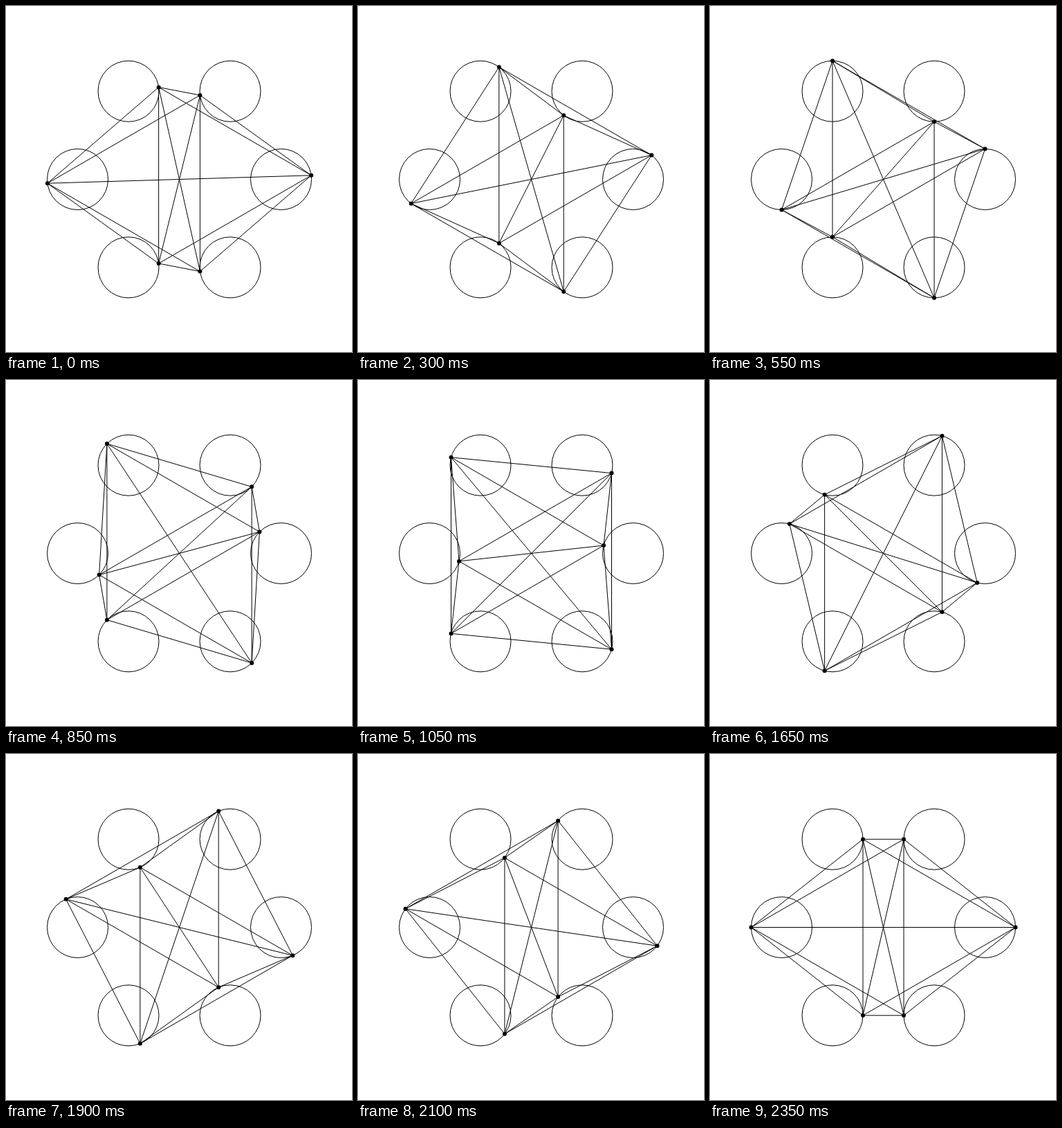
Write an HTML page with a canvas that moves like this. It is 500 by 500 pixels and loops after 2.4 s.

```html
<!DOCTYPE html>
<html lang="en">
<head>
<meta charset="utf-8">
<title>Six orbits</title>
<style>
  html, body { margin: 0; width: 100%; height: 100%; overflow: hidden; background: #fff; }
  canvas { display: block; width: 500px; height: 500px; }
</style>
</head>
<body>
<canvas id="stage" width="500" height="500"></canvas>
<script>
const ctx = document.getElementById('stage').getContext('2d');
const TAU = Math.PI * 2;
const LOOP = 2400, STEP = 50, STEPS = LOOP / STEP;
const MID = 250.5, RING = 147, ORBIT = 44, DOT = 3;

const polar = (cx, cy, r, a) => ({ x: cx + r * Math.cos(a), y: cy - r * Math.sin(a) });
const centers = Array.from({ length: 6 }, (_, i) => polar(MID, MID, RING, i * TAU / 6));

function circle({ x, y }, r) {
  ctx.beginPath();
  ctx.arc(x, y, r, 0, TAU);
}

function draw(step) {
  const turn = (step + 1) / STEPS * TAU;
  // Neighbouring orbits run half a turn apart.
  const dots = centers.map((c, i) => polar(c.x, c.y, ORBIT, turn + i * Math.PI));

  ctx.fillStyle = '#fff';
  ctx.fillRect(0, 0, 500, 500);
  ctx.fillStyle = ctx.strokeStyle = '#000';
  ctx.lineWidth = 1;

  for (const c of centers) {
    circle(c, ORBIT);
    ctx.stroke();
  }
  dots.forEach((a, i) => {
    for (const b of dots.slice(i + 1)) {
      ctx.beginPath();
      ctx.moveTo(a.x, a.y);
      ctx.lineTo(b.x, b.y);
      ctx.stroke();
    }
  });
  for (const d of dots) {
    circle(d, DOT);
    ctx.fill();
  }
}

const start = performance.now();
function tick() {
  const t = Math.max(0, performance.now() - start) % LOOP;
  draw(Math.floor(t / STEP));
  requestAnimationFrame(tick);
}
tick();
</script>
</body>
</html>
```
